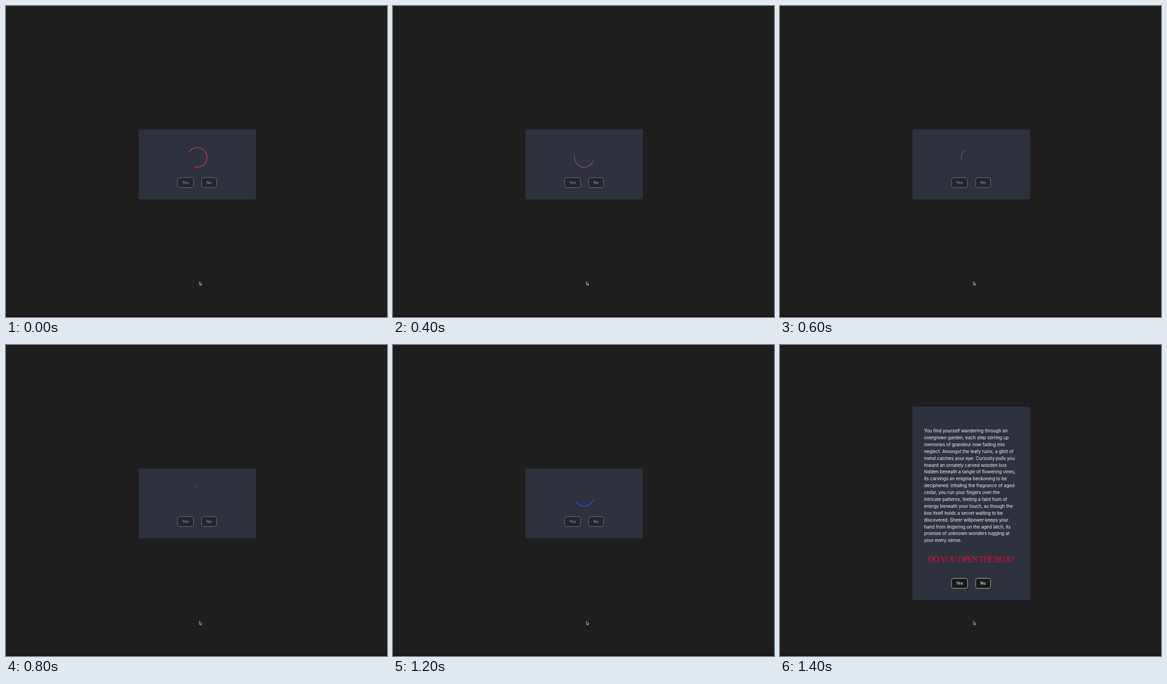
Write an HTML page that moves like this. It is 828 px wide and 676 px high and loops after 8000 ms.

```html
<!DOCTYPE html>
<html lang="en">
<head>
<meta charset="utf-8">
<title>Box story</title>
<style>
  html, body { margin: 0; width: 100%; height: 100%; overflow: hidden; background: #1e1e1e; }
  svg { display: block; width: 828px; height: 676px; }
  .story { font: 400 9.92px Inter, sans-serif; letter-spacing: -0.085px; fill: #f2f3f4; }
  .ask { font: 400 18px "Liberation Serif", serif; letter-spacing: -1.2px; fill: #c5163e; stroke: #c5163e; stroke-width: .25; }
  .button rect { fill: #1a1a1a; stroke: #fff; stroke-opacity: .85; stroke-width: .9; }
  .button text { font: 500 8.6px Inter, sans-serif; fill: #fff; fill-opacity: .9; text-anchor: middle; }
</style>
</head>
<body>
<svg viewBox="0 0 828 676">
  <rect width="828" height="676" fill="#1e1e1e"/>
  <rect y="672" width="828" height="4" fill="#1d1418"/>
  <rect id="card" x="288" width="255" rx="2" fill="#2d323e"/>
  <path id="arc" fill="none" stroke-width="2.15" stroke-linecap="round"/>
  <g id="content">
    <g id="story" class="story"></g>
    <text class="ask" x="321.5" y="472">DO YOU OPEN THE BOX?</text>
  </g>
  <g id="buttons">
    <g class="button">
      <rect x="372.8" y="373" width="34.8" height="21.7" rx="4.5"/>
      <text x="390.2" y="386.9">Yes</text>
    </g>
    <g class="button">
      <rect x="425.2" y="373" width="32.4" height="21.7" rx="4.5"/>
      <text x="441.3" y="386.9">No</text>
    </g>
  </g>
  <path id="cursor" d="M420.4 599v7.4l1.7-1.5 1.2 2.7 1.3-.6-1.2-2.6h2.2z"
    fill="#111" stroke="#f4f4f4" stroke-width=".8" stroke-linejoin="round"/>
</svg>
<script>
const LOOP = 8000, STEP = 100, READY = 1400, CURSOR_MOVE = 800;
const SPIN_OFFSET = 659; // age of the spinner when the loop begins
const CX = 415.5, CY = 329, RADIUS = 21.2;
const TURN = 40 * Math.PI; // circumference in dash units
const RED = [214, 45, 32], BLUE = [0, 87, 231];

const lines = [
  "You find yourself wandering through an",
  "overgrown garden, each step stirring up",
  "memories of grandeur now fading into",
  "neglect. Amongst the leafy ruins, a glint of",
  "metal catches your eye. Curiosity pulls you",
  "toward an ornately carved wooden box",
  "hidden beneath a tangle of flowering vines,",
  "its carvings an enigma beckoning to be",
  "deciphered. Inhaling the fragrance of aged",
  "cedar, you run your fingers over the",
  "intricate patterns, feeling a faint hum of",
  "energy beneath your touch, as though the",
  "box itself holds a secret waiting to be",
  "discovered. Sheer willpower keeps your",
  "hand from lingering on the aged latch, its",
  "promise of unknown wonders tugging at",
  "your every sense."
];

const $ = id => document.getElementById(id);
const card = $("card"), arc = $("arc"), content = $("content"),
  buttons = $("buttons"), cursor = $("cursor");

lines.forEach((line, i) => {
  const text = document.createElementNS("http://www.w3.org/2000/svg", "text");
  text.setAttribute("x", 313);
  text.setAttribute("y", 190.2 + i * 14.88);
  text.textContent = line;
  $("story").append(text);
});

const mix = (a, b, k) => a + (b - a) * k;

// cubic-bezier(.42, 0, .58, 1), solved by bisection
function easeInOut(x) {
  let lo = 0, hi = 1;
  for (let i = 0; i < 24; i++) {
    const u = (lo + hi) / 2, v = 1 - u;
    if (3 * v * v * u * .42 + 3 * v * u * u * .58 + u * u * u < x) lo = u;
    else hi = u;
  }
  return lo * lo * (3 - 2 * lo);
}

function point(angle) {
  return `${(CX + RADIUS * Math.cos(angle)).toFixed(3)} ${(CY + RADIUS * Math.sin(angle)).toFixed(3)}`;
}

function drawSpinner(age) {
  const half = (age % 1500) / 750;
  const k = easeInOut(half % 1);
  const start = half < 1 ? mix(0, 35, k) : mix(35, 124, k);
  const length = half < 1 ? mix(1, 89, k) : 89;
  const end = Math.min(start + length, TURN);
  const spin = age / 2000 * 2 * Math.PI;
  const large = end - start > TURN / 2 ? 1 : 0;
  arc.setAttribute("d",
    `M${point(spin + start / 20)}A${RADIUS} ${RADIUS} 0 ${large} 1 ${point(spin + end / 20)}`);

  const tint = easeInOut(Math.min(age / 2400, 1));
  arc.setAttribute("stroke", `rgb(${RED.map((c, i) => Math.round(mix(c, BLUE[i], tint)))})`);
}

function render(time) {
  const t = Math.floor((time % LOOP) / STEP) * STEP;
  const ready = t >= READY;
  card.setAttribute("y", ready ? 134 : 268.2);
  card.setAttribute("height", ready ? 420.5 : 152);
  content.setAttribute("visibility", ready ? "visible" : "hidden");
  arc.setAttribute("visibility", ready ? "hidden" : "visible");
  buttons.setAttribute("transform", `translate(0 ${ready ? 134.3 : 0})`);
  buttons.setAttribute("opacity", ready ? 1 : .5);
  cursor.setAttribute("transform", `translate(0 ${t >= CURSOR_MOVE ? 1.3 : 0})`);
  if (!ready) drawSpinner(t + SPIN_OFFSET);
}

const began = performance.now();
function tick() {
  render(performance.now() - began);
  requestAnimationFrame(tick);
}
tick();
</script>
</body>
</html>
```
